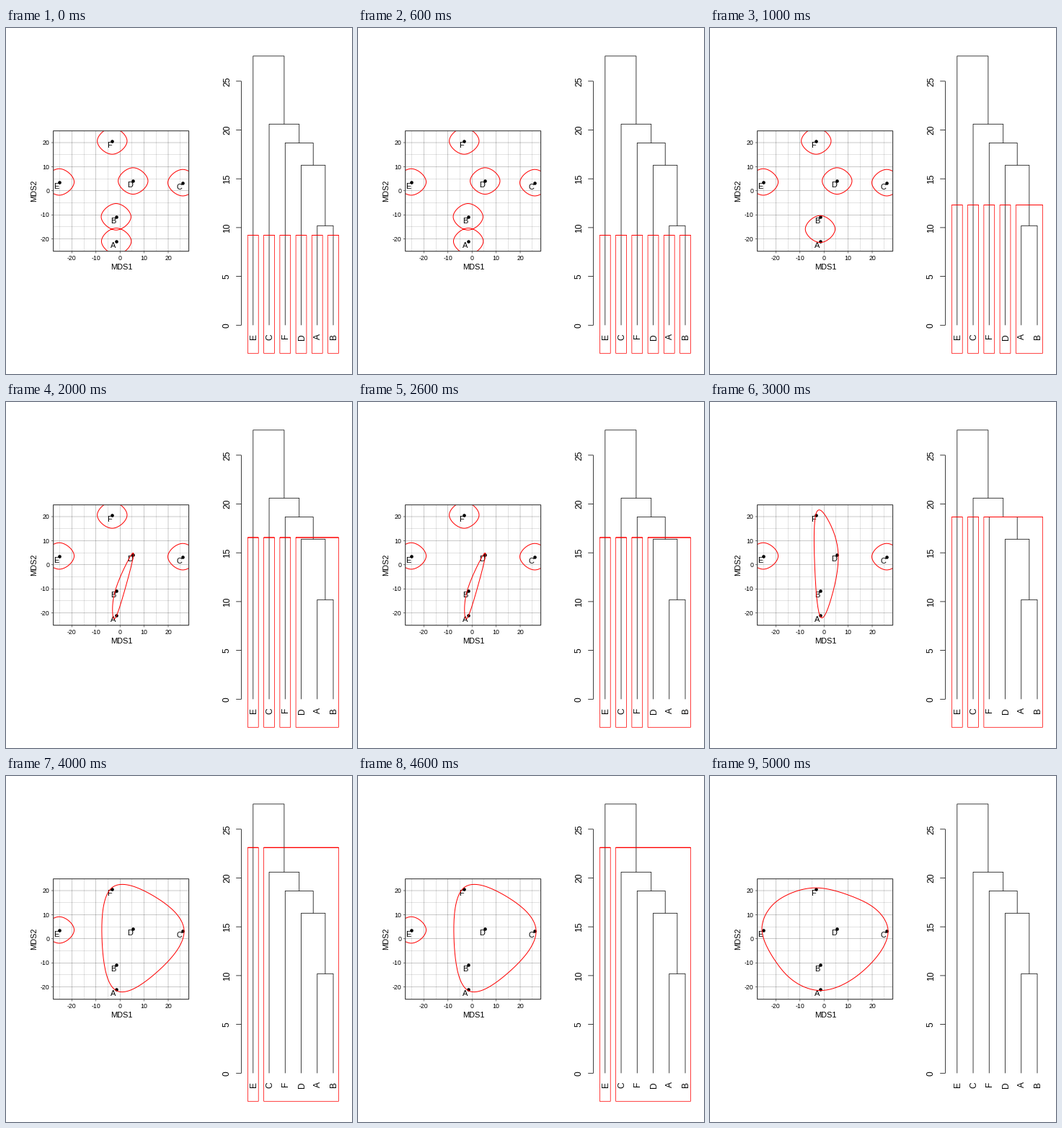
Write a matplotlib script that moves like this. It is 480x480 px and loops after 6 s.

```python
import numpy as np
import matplotlib.pyplot as plt
from matplotlib.animation import FuncAnimation
from matplotlib.patches import Rectangle

SIZE = 480
plt.rcParams["font.family"] = "Liberation Sans"
plt.rcParams["path.snap"] = False

fig = plt.figure(figsize=(SIZE / 72, SIZE / 72), dpi=72, facecolor="white")
ax = fig.add_axes([0, 0, 1, 1])
ax.set_xlim(0, SIZE)
ax.set_ylim(SIZE, 0)
ax.axis("off")


def line(xs, ys, lw, **kw):
    kw.setdefault("color", "black")
    kw.setdefault("solid_capstyle", "butt")
    return ax.plot(xs, ys, lw=lw, **kw)[0]


def label(x, y, s, size, ha="center", turn=0):
    ax.text(x, y, s, size=size, ha=ha, va="baseline", rotation=turn,
            rotation_mode="anchor", zorder=4)


# ---- scatter panel ----
LEFT, RIGHT, TOP, BOTTOM = 65.6, 253.6, 142.7, 309.7
SPAN = np.array([RIGHT - LEFT, BOTTOM - TOP])
UNIT = 3.34


def px(v):
    return 158.2 + UNIT * v


def py(v):
    return 225.8 - UNIT * v


for v in range(-25, 26, 5):
    major = v % 10 == 0
    lw = 0.21 if major else 0.11
    line([px(v)] * 2, [TOP, BOTTOM], lw, zorder=1)
    if TOP < py(v) < BOTTOM:
        line([LEFT, RIGHT], [py(v)] * 2, lw, zorder=1)
    if major:
        line([px(v)] * 2, [BOTTOM, BOTTOM + 2.75], 0.53)
        line([LEFT - 2.75, LEFT], [py(v)] * 2, 0.53)
        label(px(v), 322, str(v), 8.8)
        label(60.6, py(v) + 3.1, str(v), 8.8, "right")

panel = Rectangle((LEFT, TOP), *SPAN, fill=False, ec="#333333", lw=1.07, zorder=6)
ax.add_patch(panel)
label(160, 335.3, "MDS1", 11)
label(42.4, 226, "MDS2", 11, turn=90)

POINTS = {
    "A": (153.1, 295.9), "B": (152.7, 261.9), "C": (245.2, 214.6),
    "D": (176.3, 212.2), "E": (73.9, 213.6), "F": (147.3, 156.8),
}
for name, (x, y) in POINTS.items():
    ax.plot(x, y, "o", ms=4.6, mew=0, color="black", zorder=3)
    label(x - 0.4, y + 9.1, name, 11, "right")


# ---- smooth outlines ----
def g_blend(u):
    return u * (1 + u * (2 + u * (-4 + u * (3 - u))))


def h_blend(u):
    return u * (1 + u * (2 + u * u * (-2 - u)))


def xspline(pts, n=40):
    """Closed X-spline with shape -1, passing through every point."""
    t = np.linspace(0, 1, n)[:, None]
    w = [h_blend(-t), g_blend(1 - t), g_blend(t), h_blend(t - 1)]
    total = sum(w)
    count = len(pts)
    parts = [sum(w[j] * pts[(i + j - 1) % count] for j in range(4)) / total
             for i in range(count)]
    return np.vstack(parts)


def outline(names, spread=0.1, expand=0.01):
    pts = np.array([POINTS[c] for c in names]) / SPAN
    mid = pts.mean(axis=0)
    if len(pts) == 1:
        pts = mid + spread * np.array([(0, -1), (1, 0), (0, 1), (-1, 0)])
    elif len(pts) == 2:
        d = pts[1] - pts[0]
        side = spread * np.array([-d[1], d[0]]) / np.hypot(*d)
        pts = np.vstack([pts, mid + side, mid - side])
    off = pts - mid
    off = off[np.argsort(np.arctan2(off[:, 1], off[:, 0]))]
    off *= 1 + expand / np.hypot(off[:, 0], off[:, 1])[:, None]
    return xspline((mid + off) * SPAN)


# ---- dendrogram ----
LEAVES = "ECFDAB"
STEP = 22.24
BASE = 412.3


def leaf_x(i):
    return 342.8 + STEP * i


def hy(v):
    return BASE - 13.54 * v


line([326.4] * 2, [BASE, hy(25)], 0.75)
for v in range(0, 26, 5):
    line([319.2, 326.4], [hy(v)] * 2, 0.75)
    label(310, hy(v), str(v), 12, turn=90)

for i, c in enumerate(LEAVES):
    label(leaf_x(i) + 4.2, 424, c, 12, "right", 90)

# merge heights, from the last leaf leftwards
node_x, node_y = leaf_x(5), BASE
for i, y in zip(range(4, -1, -1), (274.3, 190.3, 159.4, 133.3, 38.9)):
    x = leaf_x(i)
    line([x, x, node_x, node_x], [BASE, y, y, node_y], 0.75,
         solid_joinstyle="miter")
    node_x, node_y = (x + node_x) / 2, y

# ---- clusters at each cut ----
HULLS = ("B", "AB", "ABD", "ADF", "ACF", "ACEF")
CUTS = (287.5, 245.5, 188.0, 159.5, 99.2)
GAP = np.full((1, 2), np.nan)


def box(first, last, top):
    pad = STEP / 3
    x0, x1 = leaf_x(first) - pad, leaf_x(last) + pad
    return np.array([(x0, top), (x1, top), (x1, 451.3), (x0, 451.3),
                     (x0, top), (x1, top)])


def joined(parts):
    if not parts:
        return [], []
    return np.vstack([p for part in parts for p in (part, GAP)]).T


def closed(curve):
    return np.vstack([curve, curve[:1]])


rings = line([], [], 1.0, color="red", zorder=5)
rings.set_clip_path(panel)
boxes = line([], [], 0.75, color="red", zorder=5, solid_joinstyle="miter")


def draw(step):
    singles = 5 - step
    rings.set_data(*joined([closed(outline(g))
                            for g in (*LEAVES[:singles], HULLS[step])]))
    frames = []
    if singles:
        top = CUTS[step]
        frames = [box(i, i, top) for i in range(singles)]
        frames.append(box(singles, 5, top))
    boxes.set_data(*joined(frames))
    return rings, boxes


anim = FuncAnimation(fig, draw, frames=6, interval=1000, repeat=True,
                     repeat_delay=0, blit=False)
plt.show()
```
